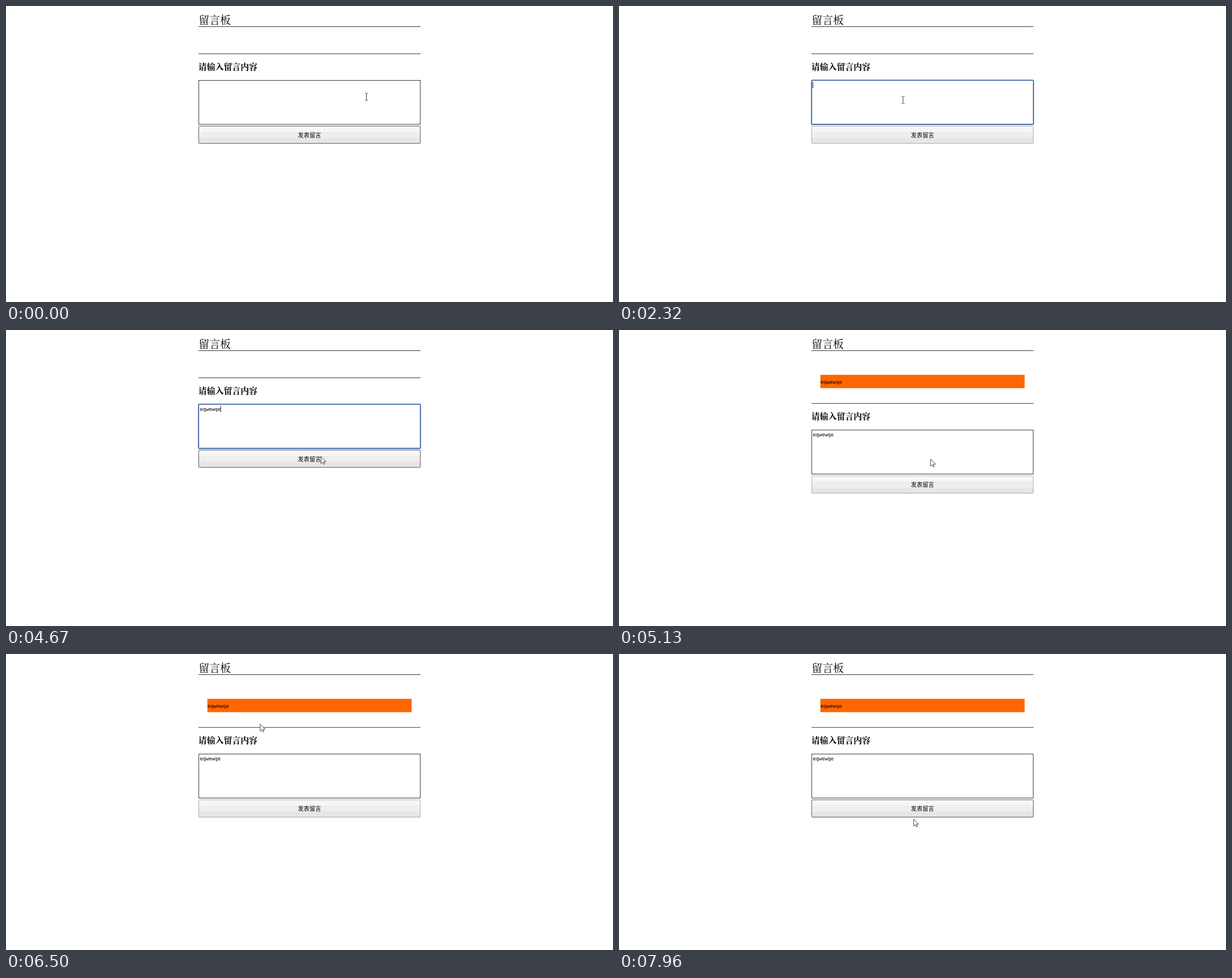
Recreate the animation shown at these times as an HTML page. Size 1072 by 523 pixels, loop 7.99 s.

```html
<!DOCTYPE html>
<html lang="zh">
<head>
<meta charset="utf-8">
<style>
  html, body { margin: 0; width: 100%; height: 100%; overflow: hidden; background: #fff; }
  svg { display: block; }
  text { font-family: "Noto Serif CJK SC", "Noto Sans CJK SC", serif; }
  .mono { font-family: "DejaVu Sans Mono", monospace; }
  .label { font-family: "Noto Sans CJK SC", "Noto Sans CJK", sans-serif; }
</style>
</head>
<body>
<!-- A 1367px wide page shown at 1072px -->
<svg width="1072" height="523" viewBox="0 0 1367 667" preserveAspectRatio="xMidYMin slice">
  <text x="434" y="41" font-size="24" font-weight="500">留言板</text>
  <rect x="433.5" y="46" width="500" height="1"/>

  <g id="post">
    <rect x="453.5" y="101" width="460" height="30" fill="#f60"/>
    <text class="mono" x="453.5" y="121" font-size="11.6">eqwewqe</text>
  </g>

  <g id="form">
    <rect x="433.5" y="107" width="500" height="1"/>
    <text x="433.3" y="143.5" font-size="19" font-weight="700">请输入留言内容</text>

    <rect x="434" y="167.5" width="499" height="99" fill="#fff" stroke="#000"/>
    <rect id="focus" x="433.5" y="167" width="500" height="100" rx="2" fill="none"
          stroke="#3a6cb4" stroke-width="2"/>
    <text id="typed" class="mono" x="436.5" y="182.3" font-size="11.1"></text>
    <rect id="caret" y="171" width="1.2" height="14"/>

    <rect x="433.5" y="270" width="500" height="40" rx="2" fill="#f6f6f6"/>
    <rect x="433.5" y="283" width="500" height="14" fill="#eee"/>
    <rect x="433.5" y="297" width="500" height="13" fill="#e6e6e6"/>
    <g fill="none">
      <rect x="434" y="270.5" width="499" height="39" rx="2" stroke="#999"/>
      <rect id="hover" x="434" y="270.5" width="499" height="39" rx="2" stroke="#555"/>
    </g>
    <text class="label" x="683.5" y="295.3" font-size="13.1" font-weight="500"
          text-anchor="middle">发表留言</text>
  </g>

  <path id="beam" fill="none" stroke="#333" stroke-width="1.2"
        d="M-2.6 -7.4H0M1.4 -7.4H4M.7 -7V8M-2.6 8.4H0M1.4 8.4H4"/>
  <path id="arrow" fill="#fff" stroke="#111"
        d="M.5 .8V17L4.3 13.3L6.8 18.8L9.1 17.8L6.8 12.4H11.8Z"/>
</svg>
<script>
  const LOOP = 7990, SHIFT = 58, CHAR = 6.69, MESSAGE = "eqwewqe";
  const FOCUS = 2320, TYPE = 2970, TYPED = 3450, PRESS = 5070, SENT = 5130, MOVED = 5460;

  // Pointer moves: start, end, and the place reached
  const moves = [
    [30, 460, 639, 211], [3710, 4490, 716, 254], [4520, 4670, 709, 284],
    [4670, 4910, 701, 290], [MOVED, 6060, 432, 121], [6260, 6500, 571, 157],
    [6500, 6770, 837, 184], [7000, 7780, 763, 307], [7780, 7960, 663, 371]
  ];

  const el = id => document.getElementById(id);
  const show = (id, on) => el(id).style.display = on ? "" : "none";
  const within = (v, a, b) => v >= a && v < b;
  const clamp = (v, low, high) => Math.min(high, Math.max(low, v));
  const progress = (t, a, b) => clamp((t - a) / (b - a), 0, 1);
  const burst = (t, from, gap, keys) => clamp(Math.floor((t - from) / gap) + 1, 0, keys);

  function pointerAt(t) {
    let x = 811, y = 204;
    for (const [start, end, toX, toY] of moves) {
      const p = progress(t, start, end);
      x += (toX - x) * p;
      y += (toY - y) * p;
    }
    return [x, y];
  }

  function draw(t) {
    const shift = t >= SENT ? SHIFT : 0;
    const focused = within(t, FOCUS, PRESS);
    show("post", shift);
    show("focus", focused);
    el("form").setAttribute("transform", `translate(0 ${shift})`);

    const count = burst(t, TYPE, 86, 4) + burst(t, 3390, 30, 3);
    const lastKey = t < TYPE ? FOCUS : Math.min(t, TYPED);
    el("typed").textContent = MESSAGE.slice(0, count);
    el("caret").setAttribute("x", 436 + CHAR * count);
    show("caret", focused && (t - lastKey) % 1060 < 530);

    const [x, y] = pointerAt(t), formY = y - shift;
    const overButton = within(formY, 270, 314);
    el("hover").setAttribute("opacity", overButton ? 1 : 1 - progress(t, 30, 460));

    // The pointer shape only updates once the mouse moves again.
    const overText = within(formY, 167, 268) ||
      (within(formY, 127, 147) && within(x, 433, 567));
    const beam = overText && !within(t, SENT, MOVED);
    show("beam", beam);
    show("arrow", !beam);
    el(beam ? "beam" : "arrow").setAttribute("transform", `translate(${x} ${y})`);
  }

  const start = performance.now();
  function frame() {
    draw((performance.now() - start) % LOOP);
    requestAnimationFrame(frame);
  }
  frame();
</script>
</body>
</html>
```
